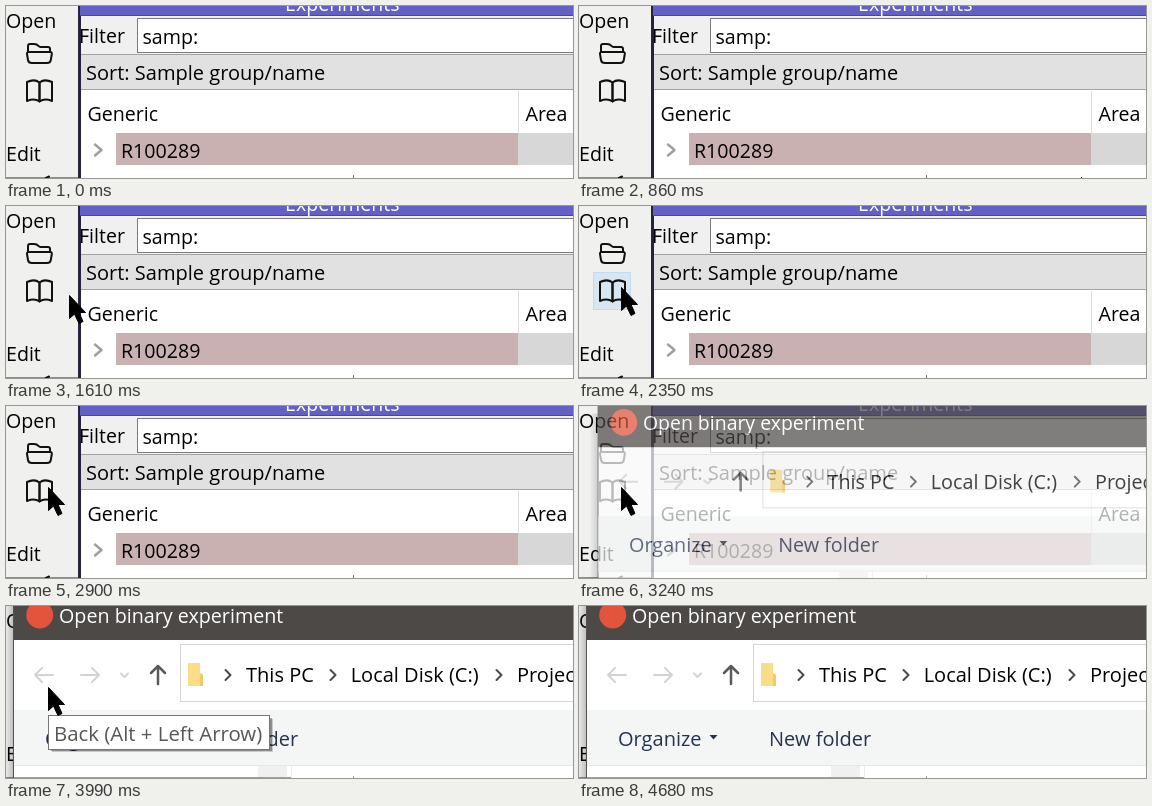
Animation of 567x172 px, one loop 5340 ms. Source, as an HTML page:

```html
<!DOCTYPE html>
<html lang="en">
<head>
<meta charset="utf-8">
<title>Open binary experiment</title>
<style>
  html, body { margin: 0; width: 100%; height: 100%; overflow: hidden; background: #fff; }
  svg { display: block; width: 567px; height: 172px; }
  text { font-family: "Open Sans", "Noto Sans", sans-serif; font-size: 19.6px; white-space: pre; }
  .line { fill: none; stroke-linecap: round; stroke-linejoin: round; }
  #dialog { transform-origin: 900px 585px; }
  #dialog text, .sort { font-size: 20px; }
  #dialog .title { font-size: 19.7px; }
  #tip text { font-size: 20.4px; }
</style>
</head>
<body>
<svg viewBox="0 0 567 172">
  <defs>
    <linearGradient id="shade">
      <stop offset="0" stop-color="#000" stop-opacity=".03"/>
      <stop offset="1" stop-color="#000" stop-opacity=".22"/>
    </linearGradient>
    <path id="chevron" class="line" d="M-2.5 -5L2.5 0L-2.5 5"/>
    <path id="page" d="M0 -8.500Q-5 -12.500 -12.500 -9V10Q-5 7 0 10.500Z"/>
  </defs>

  <g id="app">
    <rect width="567" height="172" fill="#fff"/>
    <rect width="73" height="172" fill="#f0f0ef"/>
    <rect y="171" width="75" height="1" fill="#8c8c8c"/>
    <text x="0" y="22">Open</text>
    <text x="0" y="155">Edit</text>
    <rect id="hover" x="14.5" y="66.5" width="37" height="37" fill="#d8e6f2" stroke="#c0dcf3"/>
    <g class="line" stroke="#111" stroke-width="2">
      <path d="M22 46V40Q22 38 24 38H28Q31 38 32.500 40Q34 41 35 41H42Q44 41 44 43V46"/>
      <path d="M22.500 46H44.500Q46 46 45.800 48L44.800 54Q44.500 57 41 57H26Q22.500 57 22 54L21 48Q20.800 46 22.500 46"/>
      <use href="#page" transform="translate(33.5 85)"/>
      <use href="#page" transform="translate(33.5 85) scale(-1 1)"/>
      <path d="M40 172L43 170.500"/>
    </g>

    <rect x="72" width="3" height="172" fill="#25233f"/>
    <rect x="74" width="493" height="9" fill="#6461c6"/>
    <rect x="74" y="9" width="493" height="1" fill="#4a4890"/>
    <text x="279" y="5" fill="#fff">Experiments</text>
    <rect x="75" y="10" width="492" height="38" fill="#f0f0f0"/>
    <rect x="131.500" y="12.500" width="440" height="34" fill="#fff" stroke="#7a7a7a"/>
    <text x="73" y="37">Filter</text>
    <text x="136.500" y="38">samp:</text>
    <rect x="75" y="48" width="492" height="36" fill="#e1e1e1"/>
    <path d="M75 48.500H567M75 83.500H567" stroke="#a3a3a3"/>
    <text class="sort" x="80" y="74">Sort: Sample group/name</text>
    <text x="81.500" y="115">Generic</text>
    <text x="519.500" y="115">Area</text>
    <path d="M512.500 85V127" stroke="#dedede"/>
    <rect x="110" y="127" width="402" height="32" fill="#cab1b1"/>
    <rect x="512" y="127" width="55" height="32" fill="#d7d7d7"/>
    <path class="line" d="M89 138.500L95.500 144L89 149.500" stroke="#a0a0a0" stroke-width="2.500"/>
    <text x="115" y="152">R100289</text>
    <path d="M347.500 169V172" stroke="#777"/>
  </g>

  <g id="dialog">
    <rect width="8" height="200" fill="url(#shade)"/>
    <rect x="7" y="-16" width="600" height="220" fill="#55524f"/>
    <rect x="8" y="34" width="600" height="170" fill="#fff"/>
    <rect x="8" y="-15" width="600" height="49" fill="#4c4947"/>
    <circle cx="33.700" cy="9" r="13.500" fill="#e4533b"/>
    <text class="title" x="53" y="17" fill="#fff">Open binary experiment</text>

    <g class="line" stroke="#d3d3d3" stroke-width="2">
      <path d="M47 69H29M36 62L29 69L36 76"/>
      <path d="M75 69H93M86 62L93 69L86 76"/>
      <path d="M115 67.500L118.500 71L122 67.500"/>
      <path d="M152 78V60M145 67L152 60L159 67" stroke="#5a5a5a" stroke-width="2.500"/>
    </g>
    <rect x="174.500" y="38.500" width="440" height="57" fill="#fff" stroke="#d5d5d5"/>
    <path d="M182 57H194V67L197 69V80H182Z" fill="#fbdc87"/>
    <path d="M194 67L197 69V80H194Z" fill="#efc970"/>
    <g stroke="#4a4a4a" stroke-width="2">
      <use href="#chevron" x="222" y="69"/>
      <use href="#chevron" x="327" y="69"/>
      <use href="#chevron" x="493" y="69"/>
    </g>
    <text x="240" y="76">This PC</text>
    <text x="344.700" y="76">Local Disk (C:)</text>
    <text x="511" y="76">Project</text>

    <rect x="8" y="104" width="600" height="56" fill="#f4f6f6"/>
    <path d="M8 159.500H608" stroke="#e6e8e8"/>
    <g fill="#243450">
      <text x="39" y="140">Organize</text>
      <path d="M130.500 129H138.500L134.500 133.500Z"/>
      <text x="190" y="140">New folder</text>
    </g>
    <rect x="252" y="160" width="29" height="40" fill="#f0f0f0"/>
    <path d="M285.500 160V200" stroke="#ececec"/>
    <rect x="8" y="171" width="277" height="1" fill="#a0a0a0"/>
    <path d="M347.500 170V173" stroke="#999"/>
  </g>

  <g id="tip">
    <rect x="46" y="113" width="221" height="33" fill="#000" opacity=".18"/>
    <rect x="45" y="112" width="221" height="33" fill="#000" opacity=".3"/>
    <rect x="42.500" y="109.500" width="221" height="34" fill="#fff" stroke="#767676"/>
    <text x="48" y="135" fill="#575757">Back (Alt + Left Arrow)</text>
  </g>

  <circle id="click" cx="42" cy="81" r="21" fill="#ffee58"/>
  <path id="cursor" d="M.5 .5V23.500L5.500 19L10 28.500L14 26.500L10 17.500H16.500Z" stroke="#000" stroke-linejoin="round"/>
</svg>
<script>
const LOOP = 5340;
const [hover, dialog, tip, click, cursor] =
  ["hover", "dialog", "tip", "click", "cursor"].map(id => document.getElementById(id));

// Progress from 0 to 1 in equal jumps; the first is at start, the last at end.
function ramp(t, start, end, steps) {
  const jumps = Math.floor((t - start + .5) * (steps - 1) / (end - start)) + 1;
  return Math.min(Math.max(jumps, 0), steps) / steps;
}
const easeOut = p => 1 - (1 - p) ** 2.4;
const linear = p => p;

const entry = [647, 196];
const moves = [
  { start: 860, end: 1350, steps: 8, to: [118, 106], ease: easeOut },
  { start: 1410, end: 1880, steps: 7, to: [43, 83], ease: easeOut },
  { start: 1950, end: 2350, steps: 2, to: [42, 81], ease: linear },
  { start: 4390, end: 4680, steps: 5, to: [365, 142], ease: linear }
];

function pointer(t) {
  return moves.reduce((at, { start, end, steps, to, ease }) => {
    const p = ease(ramp(t, start, end, steps));
    return at.map((v, i) => v + (to[i] - v) * p);
  }, entry);
}

function draw(now) {
  const t = now % LOOP;
  const [x, y] = pointer(t).map(Math.round);
  cursor.style.transform = `translate(${x}px, ${y}px)`;
  cursor.style.opacity = t >= 860 && t < 4680 ? 1 : 0;
  cursor.style.fill = t < 1410 ? "#2d4850" : "#000";

  const release = ramp(t, 2770, 2900, 2);
  hover.style.opacity = ramp(t, 1750, 1880, 2) - release;
  click.style.opacity = .5 * (ramp(t, 2550, 2620, 2) - release);

  const open = easeOut(ramp(t, 3170, 3450, 5));
  dialog.style.opacity = open;
  dialog.style.transform = `scale(${1 - .044 * (1 - open)})`;
  tip.style.opacity = ramp(t, 3710, 3990, 5) - ramp(t, 4390, 4680, 5);

  requestAnimationFrame(draw);
}
draw(performance.now());
</script>
</body>
</html>
```
